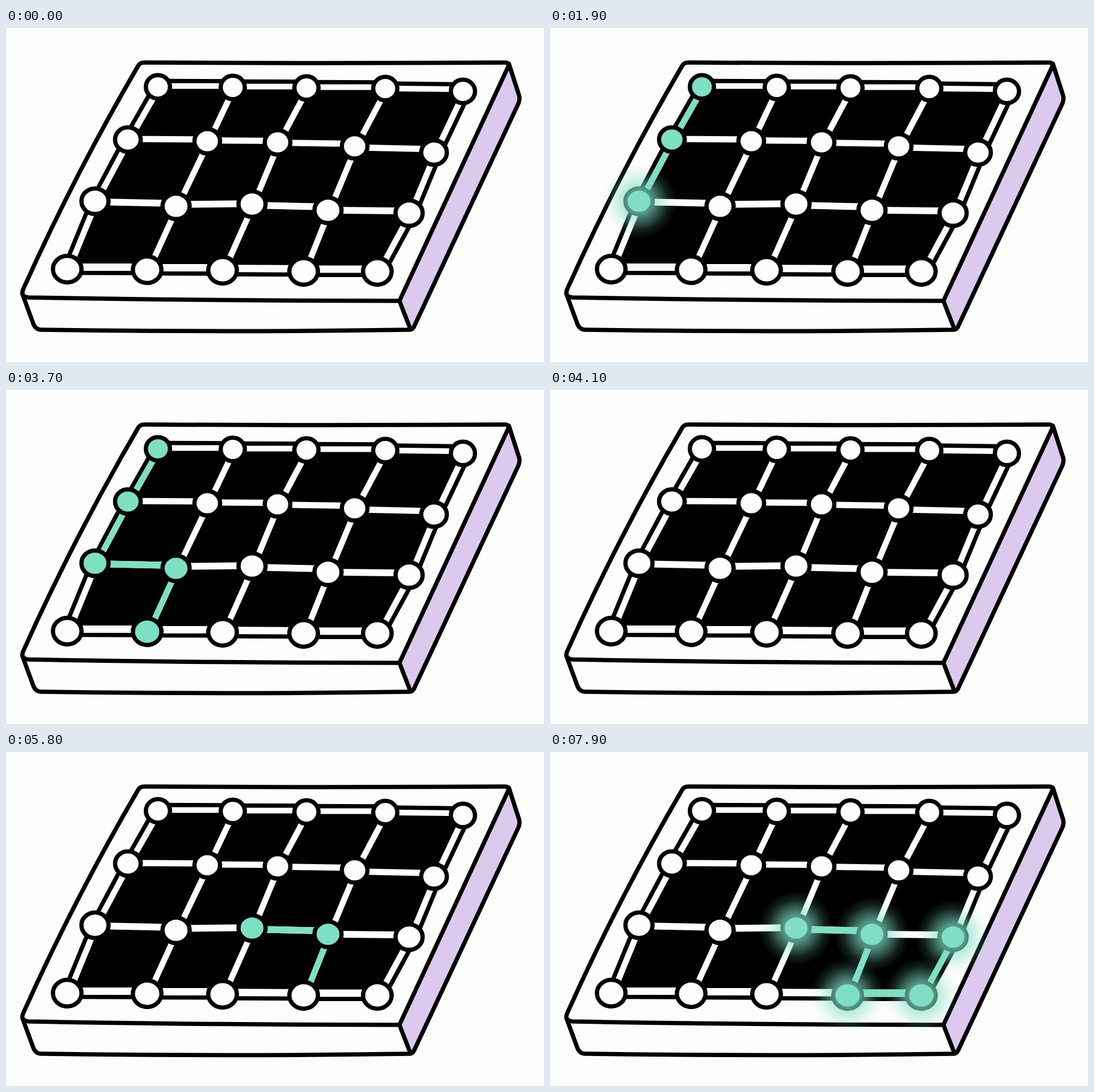
Recreate the animation shown at these times as an HTML page. Size 949 by 590 pixels, loop 8 s.

```html
<!DOCTYPE html>
<html lang="en">
<head>
<meta charset="utf-8">
<title>Grid board</title>
<style>
  html, body { margin: 0; width: 100%; height: 100%; overflow: hidden; background: #fdfdfc; }
  svg { display: block; width: 949px; height: 590px; }
  .ink { fill: none; stroke: #000; stroke-width: 7.5; stroke-linejoin: round; stroke-linecap: round; }
</style>
</head>
<body>
<svg viewBox="0 0 949 590">
  <defs>
    <radialGradient id="halo">
      <stop offset="0" stop-color="#7fdfc3" stop-opacity=".85"/>
      <stop offset=".35" stop-color="#7fdfc3" stop-opacity=".66"/>
      <stop offset=".55" stop-color="#7fdfc3" stop-opacity=".42"/>
      <stop offset=".77" stop-color="#7fdfc3" stop-opacity=".15"/>
      <stop offset="1" stop-color="#7fdfc3" stop-opacity="0"/>
    </radialGradient>
  </defs>
  <path fill="#dccaee" d="M888 66L906 126L716 533L694 482Z"/>
  <g class="ink">
    <path d="M244 61Q560 63 880 61Q889 61 885 70L694 482Q360 482 40 476Q24 474 31 460Q122 257 233 67Q236 61 244 61"/>
    <path d="M29 470L48 522Q52 533 62 533Q400 538 712 533Q717 533 720 527L904 133Q907 126 905 119L887 63M694 482L713 531"/>
  </g>
  <g id="base"></g>
  <g id="trail"></g>
  <g id="dots"></g>
  <g id="glow"></g>
</svg>
<script>
  const GREEN = '#7fdfc3', WHITE = '#fefefd', RING = 7.5;

  // Hand-placed dot centres, row by row
  const rows = [
    [[268, 104], [400, 105], [530, 106], [669, 107], [806, 112]],
    [[215, 197], [355, 200], [479, 202], [615, 209], [755, 220]],
    [[157, 306], [300, 315], [434, 311], [568, 322], [711, 327]],
    [[108, 426], [249, 427], [382, 428], [525, 430], [655, 430]]
  ];
  const lastRow = rows.length - 1, lastCol = rows[0].length - 1;

  const make = (parent, tag, attrs) => {
    const el = document.createElementNS('http://www.w3.org/2000/svg', tag);
    for (const key in attrs) el.setAttribute(key, attrs[key]);
    return document.getElementById(parent).appendChild(el);
  };
  const mix = (a, b, f) => a + (b - a) * f;
  const clamp = v => Math.max(0, Math.min(1, v));

  // A lane joins two neighbouring dots; level lanes tilt less than the dots do.
  function lane([r1, c1], [r2, c2]) {
    const [x1, y1] = rows[r1][c1], [x2, y2] = rows[r2][c2];
    const level = r1 === r2;
    const rim = level ? r1 % lastRow === 0 : c1 % lastCol === 0;
    const gap = 24 / Math.hypot(x2 - x1, y2 - y1);
    const at = f => {
      const s = mix(gap, 1 - gap, f);
      return level
        ? [mix(x1, x2, s), mix(y1, y2, mix(0.5, s, 0.3)) - (r1 === lastRow ? 4 : 2)]
        : [mix(x1, x2, s) + 3, mix(y1, y2, s)];
    };
    return { at, rim, width: level ? 10 + r1 : 10.5 };
  }

  function drawLane({ at, width }, parent, stroke, border = 0) {
    const reach = border ? 0.2 : 0;
    const [x1, y1] = at(-reach), [x2, y2] = at(1 + reach);
    return make(parent, 'line', { x1, y1, x2, y2, stroke, 'stroke-width': width + 2 * border });
  }

  const lanes = [];
  rows.forEach((row, r) => row.forEach((dot, c) => {
    if (c < lastCol) lanes.push(lane([r, c], [r, c + 1]));
    if (r < lastRow) lanes.push(lane([r, c], [r + 1, c]));
    if (c < lastCol && r < lastRow) {
      const below = rows[r + 1];
      make('base', 'polygon', { points: [dot, row[c + 1], below[c + 1], below[c]].join(' ') });
    }
  }));
  lanes.filter(l => l.rim).forEach(l => drawLane(l, 'base', '#000', RING));
  lanes.forEach(l => drawLane(l, 'base', WHITE));

  // Dots grow towards the viewer.
  const dots = rows.map((row, r) => row.map(([cx, cy]) => make('dots', 'ellipse', {
    cx, cy, rx: 21.3 + 1.3 * r, ry: 20.7 + 0.9 * r,
    fill: WHITE, stroke: '#000', 'stroke-width': RING
  })));

  const routes = [
    [[0, 0], [1, 0], [2, 0], [2, 1], [3, 1]],
    [[2, 2], [2, 3], [3, 3], [3, 4], [2, 4]]
  ].map(stops => stops.map(([r, c], k) => {
    const [cx, cy] = rows[r][c];
    const next = stops[k + 1] && lane([r, c], stops[k + 1]);
    return {
      dot: dots[r][c],
      halo: make('glow', 'circle', { cx, cy, r: 66, fill: 'url(#halo)' }),
      next,
      line: next && drawLane(next, 'trail', GREEN)
    };
  }));

  // Timing in ticks of 100 ms; each route takes one span.
  const TICK = 100, SPAN = 40, START = 5, PACE = 7;

  // A dot flashes as it lights, and the whole route flashes at the end.
  function haloLevel(tick, age) {
    const ending = tick - (SPAN - 2);
    if (ending >= 0) return (1 + ending) / 2;
    return age < 0 ? 0 : clamp(1 - age / 2);
  }

  function show(tick) {
    const active = Math.floor(tick / SPAN), local = tick % SPAN;
    routes.forEach((stops, n) => stops.forEach(({ dot, halo, next, line }, k) => {
      const age = n === active ? local - START - k * PACE : -1;
      dot.setAttribute('fill', age >= 0 ? GREEN : WHITE);
      halo.setAttribute('opacity', n === active ? haloLevel(local, age) : 0);
      if (!next) return;
      const grown = clamp((age - 2) / 4);
      const [x, y] = next.at(grown);
      line.setAttribute('x2', x);
      line.setAttribute('y2', y);
      line.setAttribute('visibility', grown ? 'visible' : 'hidden');
    }));
  }

  const begin = performance.now();
  function frame() {
    show(Math.floor((performance.now() - begin) / TICK) % (SPAN * routes.length));
    requestAnimationFrame(frame);
  }
  frame();
</script>
</body>
</html>
```
